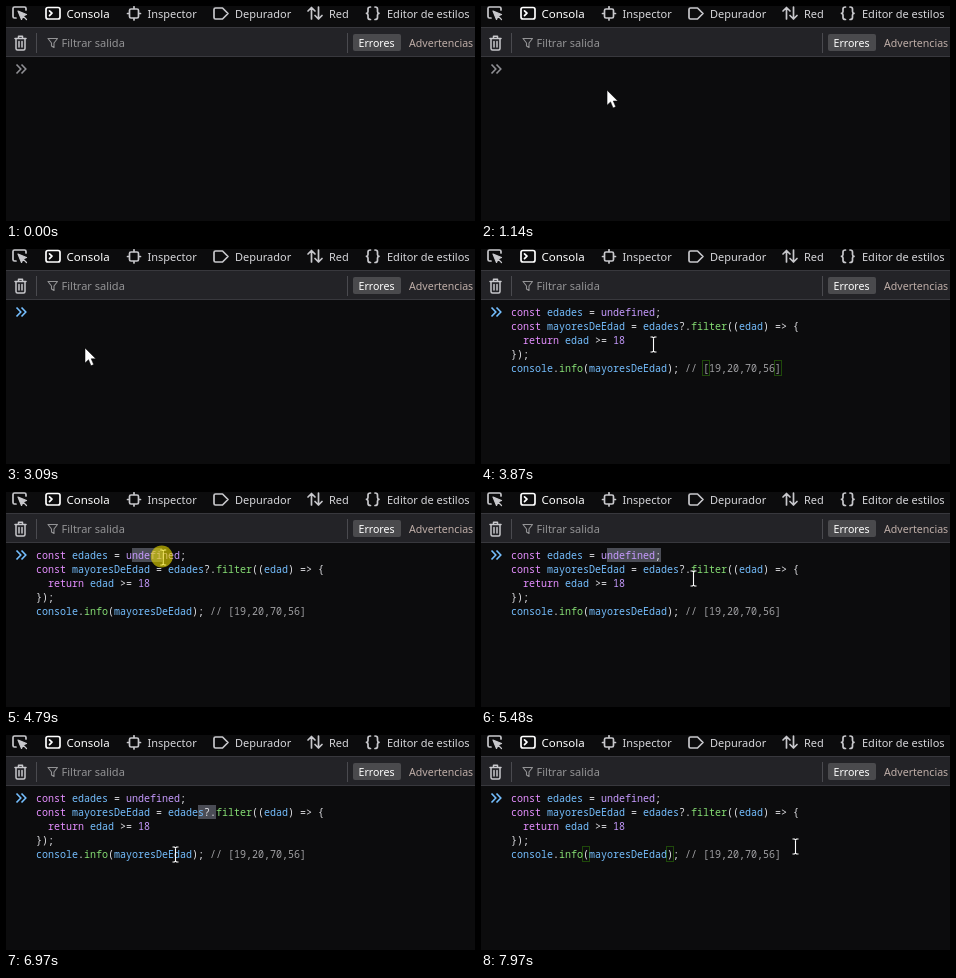
An HTML page for the animation above (8000 ms loop, 469 px wide and 215 px high).

```html
<!DOCTYPE html>
<html lang="es">
<head>
<meta charset="utf-8">
<title>Consola</title>
<style>
  html, body { margin: 0; width: 100%; height: 100%; overflow: hidden; background: #0c0c0d; }
  svg { display: block; width: 100%; height: 100%; }
  .ui { font: 11px "Noto Sans", "Open Sans", sans-serif; fill: #d7d7db; }
  .ui .active { font-size: 11.5px; fill: #fff; }
  .ui .filter { font-size: 10.6px; }
  .code { font: 500 10px "Noto Sans Mono", "DejaVu Sans Mono", monospace; }
  .icon { fill: none; stroke: #c8c8cc; stroke-width: 1.7; stroke-linejoin: round; stroke-linecap: round; }
  .key { fill: #e58fff; }
  .atom { fill: #c79bff; }
  .name { fill: #75bfff; }
  .prop { fill: #86de74; }
  .op { fill: #e4e4e8; }
  .note { fill: #a0a0a3; }
</style>
</head>
<body>
<svg viewBox="0 0 469 215">
  <rect width="469" height="215" fill="#0c0c0d"/>
  <rect y="22" width="469" height="28" fill="#232327"/>
  <path d="M0 21.5H469M0 50.5H469" stroke="#38383d"/>
  <path d="M30.5 27V47M341.5 27V47" stroke="#4a4a4f"/>

  <g class="icon">
    <path d="M10 12H8.500Q7 12 7 10.500V2.500Q7 1 8.500 1H18.500Q20 1 20 2.500V4"/>
    <path d="M12 5L20.500 8.500 17 10 15.500 13.500ZM17 10L20.500 13.500" fill="#c8c8cc" stroke-width="1.2"/>
    <g stroke="#fff">
      <rect x="40" y="1.5" width="14" height="11.5" rx="2"/>
      <path d="M43.500 4.800L46 7.200 43.500 9.700"/>
    </g>
    <rect x="123.500" y="3" width="9" height="9" rx="1.500"/>
    <path d="M121.500 7.500H123M133 7.500H134.500M128 .800V2.500M128 12.500V14"/>
    <path d="M209.500 2H216.500L222 7.500 216.500 13H209.500Q208 13 208 11.500V3.500Q208 2 209.500 2Z"/>
    <path d="M305.500 13V1.500M302 5L305.500 1.500 309 5M312.500 1V13M309 9.500L312.500 13 316 9.500"/>
    <path d="M364.500 1Q362 1 362 3V5.500Q362 7 360.500 7.300Q362 7.600 362 9V11.500Q362 13.500 364.500 13.500M369 1Q371.500 1 371.500 3V5.500Q371.500 7 373 7.300Q371.500 7.600 371.500 9V11.500Q371.500 13.500 369 13.500"/>
    <path d="M9 32.500H20M12.500 32V30.200H16.500V32M10 33V42.500Q10 44 11.500 44H17.500Q19 44 19 42.500V33M13 35.500V41M16 35.500V41" stroke-width="1.5"/>
    <path d="M42 32.500H51.500L48 37V41.500L45.500 40V37Z" stroke="#939395" stroke-width="1.1"/>
  </g>

  <g class="ui">
    <text x="60.5" y="12" class="active">Consola</text>
    <text x="141.5" y="12">Inspector</text>
    <text x="229" y="12">Depurador</text>
    <text x="323" y="12">Red</text>
    <text x="381" y="12">Editor de estilos</text>
    <text x="55.5" y="41" fill="#939395">Filtrar salida</text>
    <rect x="347" y="28" width="48" height="17" rx="2" fill="#4a4a4d"/>
    <text x="352.500" y="41" class="filter" fill="#fff">Errores</text>
    <text x="403" y="41" class="filter" fill="#bfaea8">Advertencias</text>
  </g>

  <path id="prompt" d="M10.500 58.500L14.800 63 10.500 67.500M15.500 58.500L19.800 63 15.500 67.500" fill="none" stroke-width="1.6"/>
  <rect id="selection" height="14" fill="#4a4c55"/>
  <g id="code" class="code"></g>
  <g fill="none" stroke="#58ff00" stroke-opacity=".25">
    <rect id="open" width="7" height="15"/>
    <rect id="close" width="7" height="15"/>
  </g>
  <rect id="caret" width="1" height="14" fill="#d7d7db"/>
  <path id="arrow" d="M0 0V15L3.500 11.700 6 17.700 8.700 16.600 6.200 10.800H10.800Z" fill="#fff" stroke="#000" stroke-width=".5"/>
  <path id="beam" d="M-3 -7.500H-1L0 -6.500 1 -7.500H3M0 -6.500V6.500M-3 7.500H-1L0 6.500 1 7.500H3" fill="none" stroke="#fff" stroke-width="1.1"/>
  <circle id="press" cx="-1.5" cy="-1" r="11" fill="#e6d800" opacity=".62"/>
</svg>
<script>
const LOOP = 8000, TICK = 75, BLINK = 550, PASTE = 3320;
const LEFT = 30, TOP = 56, CHAR = 6, LINE = 14;

const source = [
  "const edades = undefined;",
  "const mayoresDeEdad = edades?.filter((edad) => {",
  "  return edad >= 18",
  "});",
  "console.info(mayoresDeEdad); // [19,20,70,56]"
];

// First rule that matches names the token's class.
const rules = [
  ["note", /^\/\//],
  ["key", /^(const|return)$/],
  ["atom", /^(undefined|\d+)$/],
  ["prop", /^(filter|info)$/],
  ["name", /^\w/],
  ["op", /./]
];

// What moves the caret; an anchor means a drag that selects text.
const edits = [
  { from: 1370, hold: 80, col: 0, row: 0 },
  { from: PASTE, hold: 0, col: source[4].length, row: 4 },
  { from: 4640, hold: 360, anchor: 16, row: 0 },
  { from: 5800, hold: 70, col: 30, row: 1 },
  { from: 6040, hold: 450, anchor: 30, row: 1 },
  { from: 7350, hold: 80, col: 27, row: 4 }
];

// Pointer strokes, each from where the last one ended.
const ENTRY = { x: 372, y: 196 };
const strokes = [
  { from: 690, time: 600, x: 80.5, y: 63.5 },
  { from: 1530, time: 150, x: 79, y: 99 },
  { from: 3020, time: 750, x: 172.5, y: 95.5, sag: 20 },
  { from: 3870, time: 525, x: 125.5, y: 66 },
  { from: 4640, time: 300, x: 189, y: 65 },
  { from: 5025, time: 375, x: 212.5, y: 95.5 },
  { from: 5480, time: 0, x: 212.5, y: 86.5 },
  { from: 5630, time: 0, x: 212.5, y: 82.5 },
  { from: 6040, time: 375, x: 190, y: 75 },
  { from: 6660, time: 300, x: 169.5, y: 119.5 },
  { from: 7000, time: 200, x: 195, y: 121 },
  { from: 7580, time: 375, x: 314.5, y: 111.5, sag: 18 }
];

const el = id => document.getElementById(id);
const set = (node, attrs) => { for (const k in attrs) node.setAttribute(k, attrs[k]); };
const show = (id, on) => set(el(id), { visibility: on ? "visible" : "hidden" });
const ease = f => f * f * (3 - 2 * f);
const colX = col => LEFT + col * CHAR;
const rowY = row => TOP + row * LINE;

function pointer(t) {
  const i = strokes.findLastIndex(s => s.from <= t);
  if (i < 0) return null;
  const a = strokes[i - 1] || ENTRY, b = strokes[i];
  const spent = Math.floor((t - b.from) / TICK) * TICK;
  const f = b.time ? ease(Math.min(1, spent / b.time)) : 1;
  const sag = (b.sag || 0) * 4 * f * (1 - f);
  return { x: a.x + (b.x - a.x) * f, y: a.y + (b.y - a.y) * f + sag };
}

// Columns of the bracket that closes just before the caret and its partner.
function bracketPair({ col, row }) {
  const line = source[row], close = col - 1;
  const opener = { ")": "(", "]": "[" }[line[close]];
  return opener && [line.lastIndexOf(opener, close), close];
}

function buildCode() {
  source.forEach((line, row) => {
    for (const { 0: word, index } of line.matchAll(/\/\/.*|\w+|[^\w\s]+?(?=\/\/|\w|\s|$)/g)) {
      const node = document.createElementNS("http://www.w3.org/2000/svg", "text");
      const [type] = rules.find(([, test]) => test.test(word));
      set(node, { class: type, x: colX(index), y: rowY(row) + 11 });
      node.textContent = word;
      el("code").append(node);
    }
  });
}

function drawPointer(t, pressed) {
  const pos = pointer(t);
  const bottom = rowY(t < PASTE ? 1 : source.length);
  const overText = pos && pos.y >= TOP && pos.y < bottom;
  show("beam", overText);
  show("arrow", pos && !overText);
  show("press", pressed);
  if (!pos) return;
  for (const id of ["beam", "arrow", "press"]) {
    set(el(id), { transform: `translate(${pos.x} ${pos.y})` });
  }
}

function drawSelection(t, edit) {
  const dragged = pointer(Math.min(t, edit.from + edit.hold)).x;
  const col = Math.round((dragged - LEFT) / CHAR);
  const head = Math.min(col, source[edit.row].length);
  set(el("selection"), {
    x: colX(Math.min(edit.anchor, head)),
    y: rowY(edit.row),
    width: Math.abs(head - edit.anchor) * CHAR
  });
}

function draw(t) {
  const edit = edits.findLast(e => e.from <= t);
  const selecting = edit && "anchor" in edit;
  const typing = edit && !selecting;
  const pair = typing && bracketPair(edit);

  set(el("prompt"), { stroke: edit ? "#75bfff" : "#8f8f94" });
  show("code", t >= PASTE);
  drawPointer(t, edit && t < edit.from + edit.hold);

  show("selection", selecting);
  if (selecting) drawSelection(t, edit);

  show("caret", typing && Math.floor((t - edit.from) / BLINK) % 2 === 0);
  if (typing) set(el("caret"), { x: colX(edit.col), y: rowY(edit.row) });

  ["open", "close"].forEach((id, i) => {
    show(id, pair);
    if (pair) set(el(id), { x: colX(pair[i]) - .5, y: rowY(edit.row) - .5 });
  });
}

buildCode();
const begin = performance.now();
function frame() {
  draw((performance.now() - begin) % LOOP);
  requestAnimationFrame(frame);
}
frame();
</script>
</body>
</html>
```
